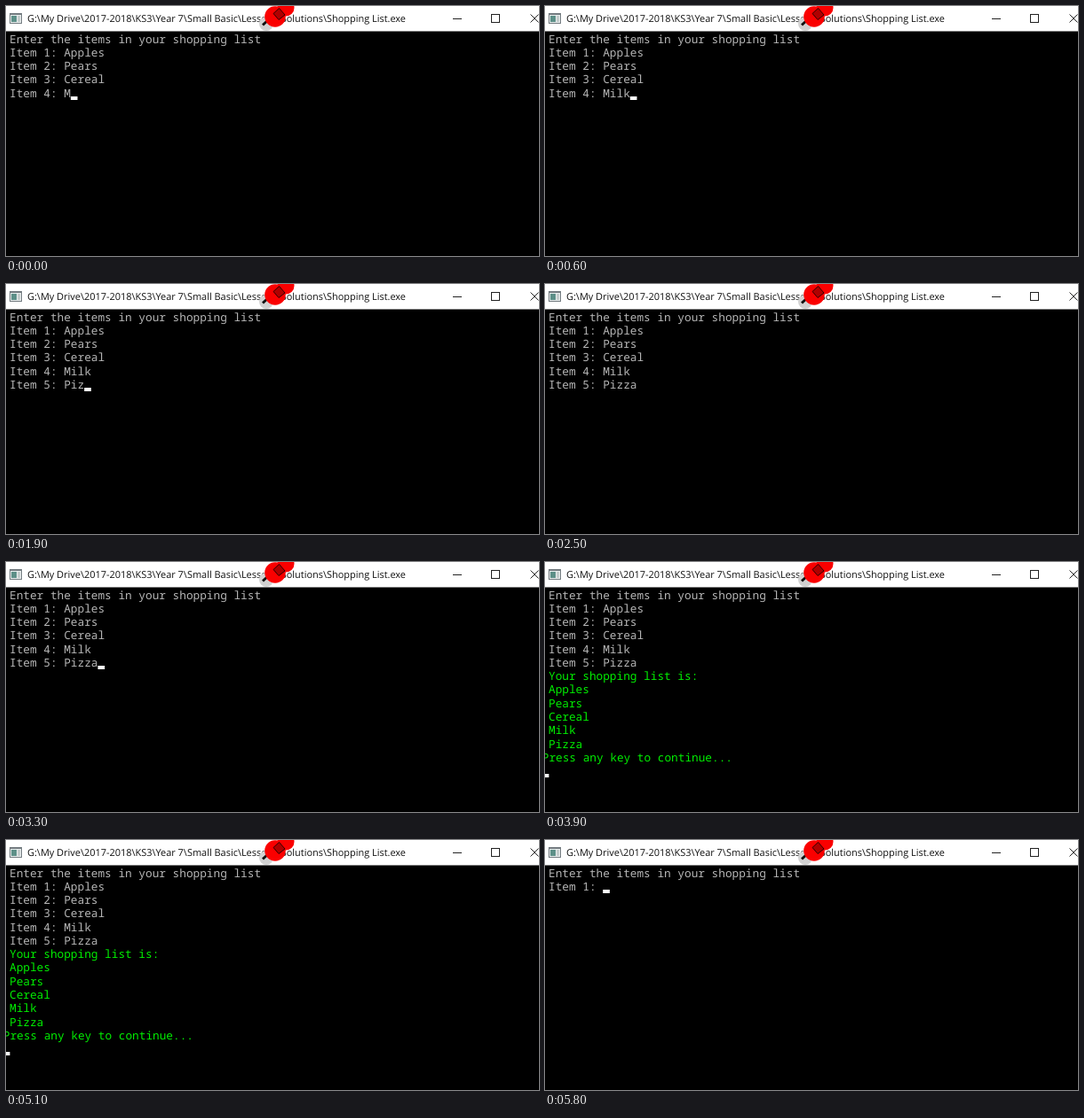
Write an HTML page with a canvas that moves like this. It is 600x282 px and loops after 5.9 s.

```html
<!DOCTYPE html>
<html lang="en">
<head>
<meta charset="utf-8">
<title>Shopping list</title>
<style>
html, body { margin: 0; width: 100%; height: 100%; overflow: hidden; background: #000; }
canvas { display: block; width: 600px; height: 282px; }
</style>
</head>
<body>
<canvas id="stage" width="600" height="282"></canvas>
<script>
const ctx = document.getElementById('stage').getContext('2d');
const LOOP = 5900, CELL = 7.65, ROW = 15.27, LEFT = 4;
const GREY = '#b6b6b6', GREEN = '#00ee00';
const PROMPT = 'Enter the items in your shopping list';
const ITEMS = ['Apples', 'Pears', 'Cereal', 'Milk', 'Pizza'];
const PATH = 'G:\\My Drive\\2017-2018\\KS3\\Year 7\\Small Basic\\Lessons\\Solutions\\Shopping List.exe';

// moments at which each further letter appears
const MILK = [0, 200, 300, 500];
const PIZZA = [1500, 1600, 1800, 2000, 2100];
const ITEM5 = 900, RESULT = 3500, RESTART = 5300;
const HIDDEN = [[2400, 2900], [4300, 4800], [5300, 5600]];

const typed = (word, times, t) => word.slice(0, times.filter(m => m <= t).length);
const itemLine = (i, word) => 'Item ' + (i + 1) + ': ' + word;

function line(text, row, color = GREY, col = 0) {
  ctx.fillStyle = color;
  [...text].forEach((ch, i) => {
    if (ch !== ' ') ctx.fillText(ch, LEFT + (col + i) * CELL, 41.6 + row * ROW);
  });
}

function cursor(col, row, t) {
  if (HIDDEN.some(([a, b]) => t >= a && t < b)) return;
  ctx.fillStyle = '#fff';
  ctx.fillRect(LEFT + col * CELL, Math.round(40.8 + row * ROW), CELL, 4);
}

function consoleText(t) {
  ctx.font = '12.75px "Noto Sans Mono", "DejaVu Sans Mono", monospace';
  line(PROMPT, 0);
  if (t >= RESTART) {
    line('Item 1:', 1);
    cursor(8, 1, t);
    return;
  }
  const words = ITEMS.slice(0, 3).concat(typed(ITEMS[3], MILK, t));
  if (t >= ITEM5) words.push(typed(ITEMS[4], PIZZA, t));
  words.forEach((w, i) => line(itemLine(i, w), i + 1));
  if (t < RESULT) {
    const last = words.length;
    cursor(8 + words[last - 1].length, last, t);
    return;
  }
  line('Your shopping list is:', 6, GREEN);
  ITEMS.forEach((w, i) => line(w, 7 + i, GREEN));
  line('Press any key to continue...', 12, GREEN, -0.95);
  cursor(-0.95, 13, t);
}

function stroke(points, color, width = 1) {
  ctx.strokeStyle = color;
  ctx.lineWidth = width;
  ctx.beginPath();
  points.forEach(([x, y], i) => i % 2 ? ctx.lineTo(x, y) : ctx.moveTo(x, y));
  ctx.stroke();
}

function disc(x, y, r, color) {
  ctx.fillStyle = color;
  ctx.beginPath();
  ctx.arc(x, y, r, 0, Math.PI * 2);
  ctx.fill();
}

function rect(x, y, w, h, color) {
  ctx.fillStyle = color;
  ctx.fillRect(x, y, w, h);
}

function pin() {
  disc(293, 20, 8, '#d2d2d2');
  stroke([[289, 21.5], [296, 15]], '#111', 3);
  disc(303, 12, 11.8, '#fa0000');
  disc(315, 2, 9.5, '#fa0000');
  ctx.fillStyle = '#b00000';
  ctx.strokeStyle = '#300';
  ctx.lineWidth = 1;
  ctx.beginPath();
  ctx.moveTo(301, 8.5);
  ctx.lineTo(307.5, 2.5);
  ctx.lineTo(314, 10);
  ctx.lineTo(307, 15.5);
  ctx.closePath();
  ctx.fill();
  ctx.stroke();
}

function titleBar() {
  rect(0, 0, 600, 28.5, '#fff');
  rect(4, 8, 14, 12, '#737b80');
  rect(5, 10, 12, 9, '#e9eeee');
  rect(6, 11, 6, 7, '#5d9088');
  rect(13, 11, 3, 7, '#c4cccc');
  ctx.font = '10.95px "Open Sans", "Noto Sans", sans-serif';
  ctx.fillStyle = '#111';
  ctx.fillText(PATH, 24, 18);
  stroke([[503, 14.5], [513, 14.5]], '#222');
  ctx.strokeRect(546.5, 9.5, 9, 9);
  stroke([[590.5, 9.5], [599.5, 18.5], [599.5, 9.5], [590.5, 18.5]], '#222');
  pin();
}

function draw(t) {
  rect(0, 0, 600, 282, '#000');
  ctx.textBaseline = 'alphabetic';
  ctx.textRendering = 'geometricPrecision';
  consoleText(t);
  titleBar();
}

const start = performance.now();
function tick() {
  draw((performance.now() - start) % LOOP);
  requestAnimationFrame(tick);
}
tick();
</script>
</body>
</html>
```
